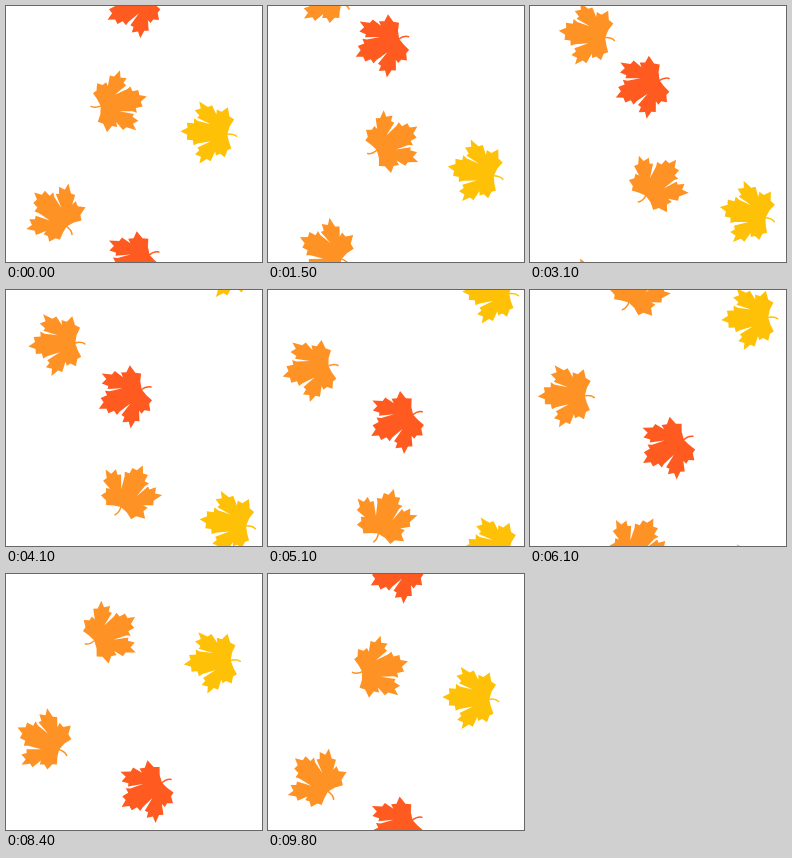
An HTML page with a canvas that plays this animation: 256 by 256 pixels, repeating every 9.9 s.

```html
<!DOCTYPE html>
<html lang="en">
<head>
<meta charset="utf-8">
<title>Falling leaves</title>
<style>
  html, body { margin: 0; width: 100%; height: 100%; overflow: hidden; background: #fff; }
  canvas { display: block; width: 100vw; height: 100vh; }
</style>
</head>
<body>
<canvas id="stage" width="256" height="256"></canvas>
<script>
const ctx = document.getElementById('stage').getContext('2d');
const SIZE = 256, LOOP = 9900, STEP = 100;
const PIVOT = { x: 20, y: -5 };

// The leaf base is at the origin and its middle lobe points along +x.
const blade = new Path2D(`M0 0 L-2 8 L-6 15 L-1 18 L1 27 L7 22 L12 24 L12 19
  L17 28 L21 26 L30 31 L28 24 L34 22 L29 17 L31 14.5 L17 9
  L30 11.5 L34 14 L34 9 L41 9 L40 4 L47 0
  L40 -3 L40 -8 L34 -8 L33 -13 L29 -11 L16 -8
  L29 -15 L27 -18 L31 -22 L25 -24 L26 -31 L19 -26 L15 -28 L11 -18
  L10 -22 L6 -20 L1 -23 L-1 -16 L-5 -14 L-2 -7 Z`);
const stem = new Path2D('M1 0 Q-6 1.5 -9.5 -1.5');

const wave = p => Math.sin(2 * Math.PI * p);
const zigzag = p => Math.asin(wave(p)) * 2 / Math.PI;

// x, y: pivot; sway and tilt: size of the swing; the phases are parts of a loop
const leaves = [
  { color: '#ff9224', x: 113.3, y: 91, sway: 12.5, swayPhase: 0, angle: -42, tilt: 30.5, tiltPhase: .25 },
  { color: '#ff9224', x: 43.2, y: 209.5, sway: 12.5, swayPhase: 0, angle: 196, tilt: 30.5, tiltPhase: .25 },
  { color: '#ffc107', x: 211, y: 132, sway: 10, swayPhase: -.25, angle: 183.5, tilt: 13.5, tiltPhase: 0 },
  { color: '#ff5a1f', x: 128, y: 6.3, sway: 16.5, swayPhase: .5, angle: 153.5, tilt: 7, tiltPhase: 0 }
];

function drawLeaf(color, x, y, degrees) {
  ctx.save();
  ctx.translate(x, y);
  ctx.rotate(degrees * Math.PI / 180);
  ctx.translate(-PIVOT.x, -PIVOT.y);
  ctx.fillStyle = ctx.strokeStyle = color;
  ctx.lineWidth = 1.5;
  ctx.lineCap = 'round';
  ctx.fill(blade);
  ctx.stroke(stem);
  ctx.restore();
}

function draw(now) {
  const p = Math.floor(now % LOOP / STEP) * STEP / LOOP;
  ctx.fillStyle = '#fff';
  ctx.fillRect(0, 0, SIZE, SIZE);
  for (const leaf of leaves) {
    const x = leaf.x + leaf.sway * wave(p + leaf.swayPhase);
    const y = (leaf.y + SIZE * p) % SIZE;
    const degrees = leaf.angle + leaf.tilt * zigzag(p + leaf.tiltPhase);
    for (const shift of [-SIZE, 0, SIZE]) drawLeaf(leaf.color, x, y + shift, degrees);
  }
}

const start = performance.now();
function tick() {
  draw(performance.now() - start);
  requestAnimationFrame(tick);
}
tick();
</script>
</body>
</html>
```
